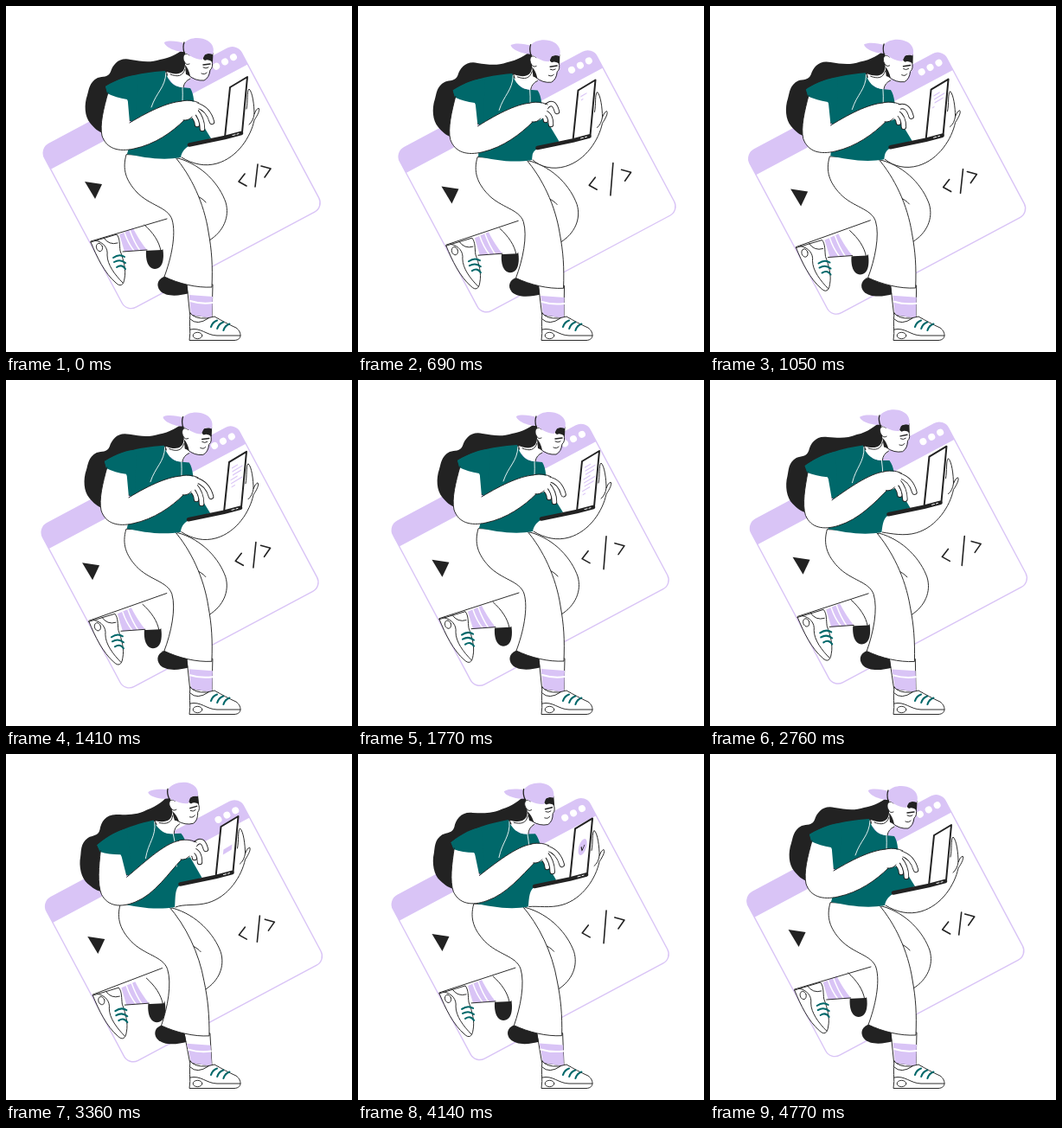
An HTML page with a canvas that plays this animation: 400x400 px, repeating every 4.8 s.

```html
<!DOCTYPE html>
<html lang="en">
<meta charset="utf-8">
<title>Walking coder</title>
<style>
html, body { margin: 0; width: 100%; height: 100%; overflow: hidden; background: #fff }
canvas { display: block }
</style>
<canvas id="stage" width="400" height="400"></canvas>
<script>
const ctx = document.getElementById('stage').getContext('2d');
const LILAC = '#d9c4f6', TEAL = '#00686a', INK = '#222', WHITE = '#fff';
const LOOP = 4800, WAIST = [187, 160];

const ramp = (t, from, to) => Math.min(1, Math.max(0, (t - from) / (to - from)));
const ease = u => u * u * (3 - 2 * u);
// Rises from a to b, holds, falls from c to d.
const pulse = (t, a, b, c, d) => ease(ramp(t, a, b)) * (1 - ease(ramp(t, c, d)));

// State of the motion at the current time.
let lean, dip, lift, float, spread;
function pose(t) {
  const angle = t / LOOP * 4 * Math.PI;
  float = [4 * Math.sin(angle), 3.4 * (1 - Math.cos(angle))];
  spread = 6 * Math.sin(angle) ** 2;
  lean = pulse(t, 2450, 3050, 3900, 4650);
  dip = pulse(t, 0, 650, 750, 1700);
  lift = 0;
  for (const start of [300, 1700, 2950])
    lift += pulse(t, start, start + 350, start + 550, start + 1000);
}

// Each warp moves a point of the resting figure to its current place.
const warps = {
  ground: (x, y) => [x, y],
  upper(x, y) {
    const turn = -0.16 * lean + -0.02 * dip, dx = x - WAIST[0], dy = y - WAIST[1];
    const cos = Math.cos(turn), sin = Math.sin(turn);
    return [WAIST[0] + dx * cos - dy * sin - 4 * dip, WAIST[1] + dx * sin + dy * cos + 3 * dip];
  },
  leg(x, y) {
    const pull = Math.sqrt(ramp(y, 360, 170));
    return [x - (7 * lean + dip) * pull, y + (2 * lean + 3 * dip) * pull];
  },
  laptop: (x, y) => [x - 10.5 * lean - 4.5 * dip, y - 10 * lean + 3.5 * dip],
  window: (x, y) => [x + float[0], y + float[1]],
  badge: (x, y) => [x + 1.4 * float[0], y + 1.3 * float[1]],
  hand: (x, y) => [x - 3 * lean - 4 * dip, y - 8 * lean + 4 * dip - 2 * lift],
  index: (x, y) => warps.hand(x - 4 * lift, y - 14 * lift),
  fingers: (x, y) => warps.hand(x, y - 7 * lift)
};
const tags = { g: 'ground', u: 'upper', l: 'leg', p: 'laptop', w: 'window', h: 'hand', i: 'index', f: 'fingers' };
let part = 'ground';

// Points follow the current part, or the one named by a tag: "x,yw".
function shape(d, fill, stroke, width = 0.95) {
  const path = new Path2D(d.replace(/(-?[\d.]+),(-?[\d.]+)([a-z]?)/g,
    (_, x, y, tag) => warps[tags[tag] || part](+x, +y).join(' ')));
  if (fill) { ctx.fillStyle = fill; ctx.fill(path); }
  if (stroke) { ctx.strokeStyle = stroke; ctx.lineWidth = width; ctx.stroke(path); }
}
const line = (d, color = INK, width) => shape(d, null, color, width);

function oval(x, y, rx, ry, fill, stroke, angle = 0) {
  ctx.beginPath();
  ctx.ellipse(...warps[part](x, y), rx, ry, angle, 0, 7);
  if (fill) { ctx.fillStyle = fill; ctx.fill(); }
  if (stroke) { ctx.strokeStyle = stroke; ctx.lineWidth = 0.95; ctx.stroke(); }
}
function finger(d) {
  line(d, INK, 6.4);
  line(d, WHITE, 4.6);
}

function browser() {
  part = 'ground';
  ctx.save();
  ctx.translate(39 + float[0], 165 + float[1]);
  ctx.rotate(-0.49);
  ctx.beginPath();
  ctx.roundRect(0, 0, 258, 214, 12);
  ctx.strokeStyle = LILAC;
  ctx.lineWidth = 1.4;
  ctx.stroke();
  ctx.beginPath();
  ctx.roundRect(0, 0, 258, 27, [12, 12, 0, 0]);
  ctx.fillStyle = LILAC;
  ctx.fill();
  for (let n = 0; n < 3; n++) oval(225 + n * 11.2, 12, 4, 4, WHITE);
  ctx.restore();

  part = 'badge';
  shape('M91,203 L111,206 L103,223 Z', INK);
  part = 'window';
  const s = spread;
  line(`M${276 - s},194 L${269 - s},203 L${278 - s},208 M291,${183 - s} L288,${209 + s}
    M${295 + s},185 L${306 + s},188 L${299 + s},198`, INK, 1.6);
}

function hair() {
  part = 'upper';
  shape(`M208,48 C200,54 191,60 178,62 C166,66 156,64 144,62 C131,59 124,67 121,76 C118,83 112,81 106,83
    C96,88 96,97 94,103 C90,114 91,128 97,135 C102,141 107,146 113,147 L150,130 L184,80 Q198,84 209,72 Z`, INK);
}

function rearLeg() {
  part = 'window';
  shape('M163,276 C160,290 163,304 172,304 C182,304 184,290 180,274 Z', INK);
  shape('M98,272 L186,246l L192,276l L180,282 L137,284 Z', WHITE);
  shape('M131,264 L147,257 C152,267 158,276 163,282 L137,284 Z', LILAC);
  line('M137,262 Q141,274 148,283 M143,259 Q148,273 155,283', WHITE, 1.5);
  line('M98,272 L186,246l M135,284 L163,282 M160,253 C170,262 177,272 179,283');
  shape(`M98,273 L128,264 C132,269 131,276 132,283 C136,294 139,305 137,315
    C136,323 132,325 127,320 C114,309 105,290 98,273 Z`, WHITE, INK);
  line('M103,271 C113,273 118,280 117,288 C117,299 126,311 135,320 M113,268 Q119,277 129,274');
  oval(108, 279, 3.5, 4.7, WHITE, INK, -0.3);
  line('M124,291 Q131,286 137,290 M125,296 Q132,292 138,297 M128,302 Q134,298 138,304', TEAL, 2);
}

function frontLeg() {
  part = 'leg';
  shape('M186,312 C175,314 173,323 178,329 C185,337 201,335 212,332 L216,318 Z', INK);
  shape('M209,318 L239,322 L238,360g L213,357g Z', WHITE, INK);
  shape('M211.5,334 L239,336 L238,361g L214,357g Z', LILAC);
  line('M213,341 Q226,345 239,343', WHITE, 2);
  shape('M199,176 C228,184 247,207 254,227 C259,244 251,261 235,271 L210,250 L180,200 Z', WHITE, INK);
  line('M219,219 Q227,222 231,227');
  shape(`M139,172 C134,189 139,202 151,215 C166,231 187,232 192,247 C197,264 191,292 183,313
    C200,321 220,326 238,325 C239,300 238,283 234,261 C229,228 214,196 195,174 Z`, WHITE, INK);
  part = 'ground';
  shape(`M213,355 Q218,362 232,361 L241,359 C250,364 257,368 266,372 C272,376 274,386 264,386.5
    L212,386.5 C214,376 211,365 213,355 Z`, WHITE, INK);
  line('M213,374 C225,371 232,381 244,381 L271,381 M213,362 Q221,370 234,361');
  oval(221.5, 381, 5.3, 3.7, WHITE, INK);
  for (let n = 0; n < 3; n++) {
    const x = 237 + n * 7.2, y = 371 + n * 2;
    line(`M${x},${y} Q${x + 2},${y - 6} ${x + 7},${y - 7.5}`, TEAL, 2.1);
  }
}

function rearArm() {
  part = 'laptop';
  const lower = `M203,175l C216,183 230,186 244,182 C268,175 283,151 287,132
    C291,126 294,120 292,118 Q289,119 287,125 C287,115 285,99 281,96 C278,99 280,110 278,119`;
  shape(lower + ' L272,144 L212,158 Z', WHITE);
  line(lower + ' M287,125 Q286,133 281,137');
}

function torso() {
  part = 'upper';
  shape(`M115,93 C130,84 151,77 184,75 C187,86 193,93 203,94 L213,95 C218,103 217,113 219,124
    L237,153p L211,162p C205,166p 203,170l 202,175l C181,179l 158,175l 140,171l
    C144,157 147,146 145,134 L118,102 Z`, TEAL);
  shape('M207,68 C206,80 196,80 186,76 C188,87 195,94 205,94 C207,90 208,86 214,84 Z', WHITE);
  line('M207,73 C204,82 198,82 190,79 M205,94 Q206,87 213,84');
  line('M185,77 C184,95 174,99 168,117 M204,94 Q205,110 202,132', WHITE, 0.9);
}

function screen(t) {
  ctx.save();
  const [x, y] = warps.laptop(259, 94);
  ctx.transform(1, -0.6, -0.103, 1, x, y);
  part = 'ground';
  ctx.fillStyle = LILAC;
  if (t < 2600) for (let n = 0; n < 10; n++) {
    const start = 480 + n * 170, width = 7 + n * 5 % 7;
    ctx.fillRect(4 + n % 3, 9 + n * 4.6, width * ramp(t, start, start + 210), 1.4);
  }
  if (t > 2900 && t < 3700) ctx.fillRect(6, 30, 10 * ramp(t, 2950, 3300), 6);
  const size = pulse(t, 3700, 3950, 4430, 4600);
  if (size) oval(11.5, 28, 5 * size, 9 * size, LILAC);
  if (size > 0.7) line('M9.8,27 L11.3,32 L13.5,27', INK, 1);
  ctx.restore();
}

function laptop(t) {
  part = 'laptop';
  shape('M259,94 L279,82 L273,146 L253,152 Z', WHITE, INK, 2);
  screen(t);
  part = 'laptop';
  line('M212,160.5 L253,152 L272,147', INK, 4.6);
  line('M262,149.5 L265,148.8 M267,148.2 L269,147.6', WHITE, 1);
}

function frontArm() {
  part = 'upper';
  const outer = 'M118,100 C113,118 108,137 111,150 C116,165 130,169 148,165 C172,160 192,146h 206,132h';
  shape(outer + ' L206,110h C190,110h 168,120 143,135 L140,100 Z', WHITE);
  shape('M115,93 C130,84 142,80 152,80 L150,131 L146,131 Q145,116 140,108 Q127,106 117,101 Z', TEAL);
  line(outer + ' M143,135 C168,120 190,110h 206,110h');
  part = 'hand';
  finger('M214,124 Q221,131f 221,137f');
  finger('M219,121 Q227,130f 227,142f');
  finger('M221,115 Q234,119i 238,134i');
  shape('M203,110 C212,108 219,111 224,114 L221,124 Q214,133 203,132 Z', WHITE);
  line('M203,110 C212,108 219,110 223,112 M215,128 Q211,133 205,132');
}

function head() {
  part = 'upper';
  shape('M207,54 L238,56 L238,67 Q239,71 237,74 L235,75 Q234,83 229,86 Q219,87 210,79 L207,72 Z', WHITE);
  line('M238,63 Q240,71 236,74 Q235,83 229,86 Q219,87 211,80');
  shape('M228,56 L239.5,54 L239,65 Q234,61 230,63 Q226,61 228,56 Z', INK);
  shape('M207,68 Q211,72 213,81 L208,79 Z', INK);
  shape('M213,58 C207,52 203,58 206,64 Q208,69 212,67 Z', WHITE);
  line('M212,57 C207,52 203,58 206,64 Q208,69 212,67', INK);
  line('M228,68 L236,67', INK, 1.5);
  line('M228,71 Q231,73 234,71 M226,78 Q230,80 232,77');
  shape(`M206,53 C196,53 183,47 183,42 C188,39 200,41 206,43 C211,36 225,35 233,40
    C240,44 241,51 239,56 Q231,53 229,58 L227,62 C218,62 211,56 206,53 Z`, LILAC);
  line('M206,42 Q204,47 206,54', INK, 1.3);
}

function frame() {
  const t = performance.now() % LOOP;
  ctx.fillStyle = WHITE;
  ctx.fillRect(0, 0, 400, 400);
  ctx.lineCap = ctx.lineJoin = 'round';
  pose(t);
  browser();
  hair();
  rearLeg();
  frontLeg();
  rearArm();
  torso();
  laptop(t);
  frontArm();
  head();
  requestAnimationFrame(frame);
}
frame();
</script>
</html>
```
